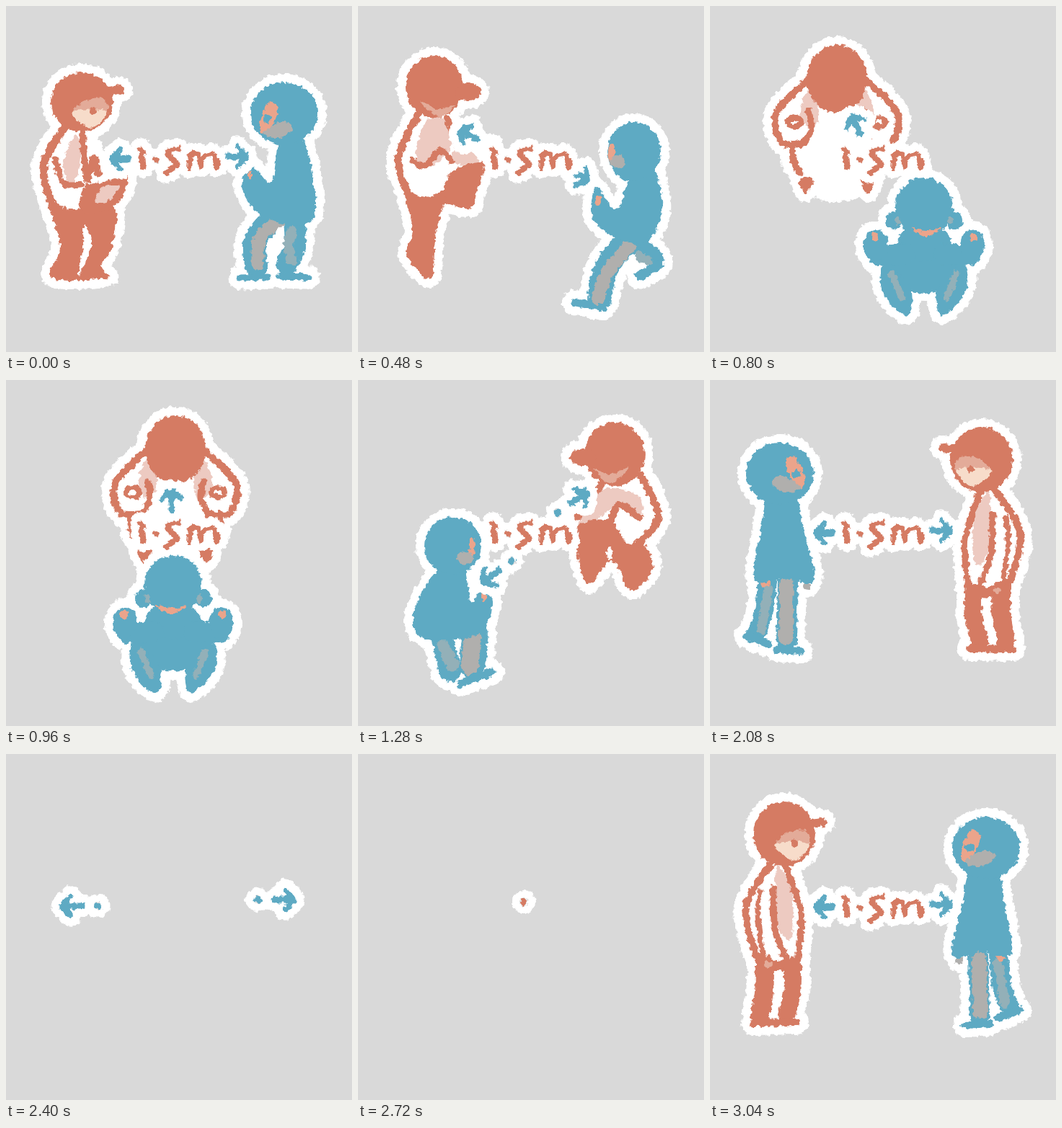
An HTML page for the animation above (3.2 s loop, 480 by 480 pixels).

```html
<!DOCTYPE html>
<html lang="en">
<head>
<meta charset="utf-8">
<title>Keep 1.5 m apart</title>
<style>
html, body { margin: 0; width: 100%; height: 100%; overflow: hidden; background: #d9d9d9; }
svg { display: block; width: 100vw; height: 100vh; }
</style>
</head>
<body>
<svg viewBox="0 0 480 480" role="img" aria-label="1.5 m">
  <filter id="fuzz" filterUnits="userSpaceOnUse" x="0" y="0" width="480" height="480" color-interpolation-filters="sRGB">
    <feTurbulence type="fractalNoise" baseFrequency=".16" numOctaves="2" seed="4"/>
    <feDisplacementMap in="SourceGraphic" scale="8" xChannelSelector="R" yChannelSelector="G"/>
  </filter>
  <g id="scene" filter="url(#fuzz)" stroke-linecap="round" stroke-linejoin="round"></g>
</svg>
<script>
const RED = '#d57b63', BLUE = '#5eaac3', WHITE = '#fff', GRAY = '#b0afad', DIM = '#93b0b8';
const PINK = '#edcac1', TAN = '#e3ab99', CREAM = '#f7dcca', SKIN = '#eba48b';

// Smooth curve through points
function spline(p, closed) {
  const n = p.length;
  const at = i => closed ? p[(i + n) % n] : p[Math.max(0, Math.min(n - 1, i))];
  let d = 'M' + p[0];
  for (let i = 0; i < (closed ? n : n - 1); i++) {
    const mix = (u, v, w) => u.map((q, k) => (q + (w[k] - v[k]) / 6).toFixed(1));
    d += `C${mix(at(i), at(i - 1), at(i + 1))} ${mix(at(i + 1), at(i + 2), at(i))} ${at(i + 1)}`;
  }
  return closed ? d + 'Z' : d;
}

const pairs = v => v.flatMap((x, i) => i % 2 ? [] : [[x, v[i + 1]]]);
const path = (v, closed) => `<path d="${spline(pairs(v), closed)}"`;
const blob = (color, ...v) => ({ color, w: 0, tag: path(v, true) });
const line = (color, w, ...v) => ({ color, w, tag: path(v, false) });
const oval = (color, x, y, rx, ry = rx) =>
  ({ color, w: 0, tag: `<ellipse cx="${x}" cy="${y}" rx="${rx}" ry="${ry}"` });

// A part and its mirror image about x = c
const both = (c, part) =>
  [part, { ...part, tag: `${part.tag} transform="translate(${2 * c} 0) scale(-1 1)"` }];

const paint = (tag, fill, color, w) =>
  `${tag} fill="${w && !fill ? 'none' : color}" stroke="${w ? color : 'none'}" stroke-width="${w}"/>`;

// All parts over one shared white rim
function draw(rim, ...parts) {
  const list = parts.flat();
  return list.map(p => paint(p.tag, !p.w, WHITE, p.w + rim)).join('') +
    list.map(p => paint(p.tag, !p.w, p.color, p.w)).join('');
}
const fig = (...parts) => draw(24, ...parts);

const group = (inner, t) => `<g transform="${t}">${inner}</g>`;
const move = (inner, x, y) => group(inner, `translate(${x} ${y})`);
const flip = inner => group(inner, 'translate(480 0) scale(-1 1)');

const redHead = (x, y, ry) => [
  line(RED, 12, x + 15, y - 12, x + 53, y - 17),
  oval(RED, x, y, 43, ry),
  blob(TAN, x - 12, y + 18, x + 3, y - 1, x + 31, y - 4, x + 32, y + 18),
  blob(CREAM, x - 14, y + 14, x + 32, y + 12, x + 26, y + 29, x + 8, y + 35),
  oval(RED, x + 15, y + 13, 5)
];
const blueHead = (x, y, fy) => [
  oval(BLUE, x, y, 47, 43),
  blob(SKIN, x - 35, fy + 7, x - 21, fy - 24, x - 8, fy - 13, x - 25, fy + 21),
  blob(GRAY, x - 30, fy + 19, x - 2, fy + 3, x + 12, fy + 13, x - 8, fy + 26),
  oval(BLUE, x - 23, fy, 6)
];

// b sways the bodies between planted feet and still heads
const redCrouch = b => fig(
  blob(WHITE, 82, 165, 55, 215, 64, 275, 112, 282, 132, 240, 108, 168),
  blob(PINK, 95, 180, 79 + b, 222, 94 + b, 250, 104, 200),
  blob(RED, 56, 265, 88, 282, 149, 278, 147, 332, 132, 362, 141, 377, 63, 377, 75 + b, 332),
  blob(WHITE, 108, 304, 119 + b, 328, 101, 374, 107 + b, 335),
  blob(RED, 110, 250, 140 + b, 243, 168 + b, 231, 163 + b, 262, 142, 282, 105, 285),
  blob(PINK, 124, 270, 135 + b, 251, 158 + b, 250, 140, 271),
  line(RED, 11, 82, 167, 52 + b, 222, 66, 282),
  line(RED, 9, 106, 168, 112 + b, 240, 122 + b, 211, 128 + b, 232),
  line(RED, 9, 68 + b, 212, 80 + b, 246, 104 + b, 248),
  redHead(105, 133, 41));

const blueCrouch = b => fig(
  line(BLUE, 32, 366, 298, 346 + b, 325, 347, 360),
  line(BLUE, 30, 400, 300, 401 + b, 330, 390, 358),
  line(BLUE, 9, 325, 377, 363, 376),
  line(BLUE, 9, 378, 375, 419, 376),
  line(GRAY, 17, 378, 299, 352 + b, 322, 349, 358),
  line(DIM, 14, 397, 312, 392 + b, 332, 397, 354),
  blob(BLUE, 380, 185, 368, 245, 340 - b, 220, 328 - b, 252, 354, 290, 413, 304, 430 - b, 272, 412, 185),
  line(SKIN, 4, 338 - b, 232, 338 - b, 238),
  blueHead(386, 149, 157));

const redStand = fig(
  blob(WHITE, 82, 150, 50, 215, 62, 282, 122, 282, 126, 215, 102, 150),
  blob(PINK, 93, 155, 115, 198, 112, 256, 94, 235),
  line(RED, 14, 68, 283, 92, 294, 120, 287),
  line(RED, 26, 76, 292, 75, 330, 69, 362),
  line(RED, 24, 115, 293, 114, 330, 106, 362),
  line(RED, 10, 60, 373, 120, 372),
  line(RED, 10, 86, 150, 50, 212, 64, 280),
  line(RED, 7, 70, 190, 66, 222, 74, 284),
  line(RED, 9, 103, 150, 126, 220, 122, 284),
  line(RED, 9, 88, 186, 90, 240, 104, 282),
  oval(TAN, 81, 292, 6, 4),
  redHead(103, 111, 45));

const blueStand = fig(
  line(BLUE, 28, 372, 280, 374, 362),
  line(BLUE, 26, 400, 280, 406, 325, 415, 350),
  line(BLUE, 10, 354, 376, 388, 374),
  line(BLUE, 12, 400, 366, 428, 355),
  line(GRAY, 20, 373, 284, 375, 358),
  line(DIM, 13, 399, 290, 409, 346),
  oval(SKIN, 404, 281, 6, 7),
  oval(GRAY, 346, 286, 5),
  blob(BLUE, 362, 160, 350, 208, 336, 278, 377, 275, 418, 277, 409, 208, 398, 160),
  blueHead(383, 130, 130));

const redKick = fig(
  blob(WHITE, 85, 150, 58, 225, 75, 268, 122, 265, 145, 205, 122, 150),
  blob(PINK, 95, 160, 125, 160, 127, 200, 94, 224, 80, 207),
  blob(PINK, 130, 205, 150, 196, 168, 218, 135, 219),
  blob(RED, 118, 262, 130, 230, 176, 217, 164, 260, 156, 281, 118, 272),
  blob(RED, 66, 260, 94, 266, 122, 258, 108, 315, 101, 378, 68, 347, 76, 310),
  line(RED, 10, 84, 150, 56, 210, 70, 262),
  line(RED, 9, 124, 156, 138, 196),
  line(RED, 9, 76, 214, 92, 222, 114, 201, 129, 215),
  oval(RED, 106, 112, 40, 43),
  oval(RED, 152, 119, 18, 12),
  blob(TAN, 86, 132, 112, 143, 134, 138, 112, 154));

const blueKick = fig(
  line(BLUE, 26, 388, 330, 411, 350),
  line(BLUE, 13, 391, 374, 418, 359),
  line(DIM, 13, 390, 346, 402, 354),
  line(BLUE, 34, 374, 328, 346, 360, 335, 405),
  line(BLUE, 10, 300, 411, 340, 419),
  line(GRAY, 18, 376, 334, 347, 368, 333, 405),
  blob(BLUE, 380, 233, 358, 283, 332, 251, 324, 290, 350, 318, 398, 328, 422, 285, 410, 225),
  oval(SKIN, 333, 270, 4, 7),
  oval(BLUE, 383, 202, 37, 41),
  oval(SKIN, 352, 204, 5, 14),
  oval(GRAY, 360, 216, 11, 9));

const redBack = fig(
  oval(WHITE, 235, 145, 80, 46),
  oval(WHITE, 235, 205, 55, 50),
  both(235, blob(PINK, 196, 110, 184, 145, 202, 168, 210, 140)),
  both(235, line(RED, 10, 197, 96, 152, 142, 158, 183, 188, 186)),
  both(235, line(RED, 9, 196, 141, 200, 164, 190, 184)),
  both(235, oval(RED, 176, 156, 13, 10)),
  both(235, oval(WHITE, 176, 156, 5, 3)),
  both(235, line(RED, 9, 172, 188, 175, 212, 184, 226)),
  both(235, blob(RED, 183, 235, 203, 235, 191, 255)),
  oval(RED, 235, 96, 42, 47));

const blueBack = fig(
  oval(BLUE, 232, 362, 54, 42),
  oval(BLUE, 232, 334, 38, 25),
  both(232, line(BLUE, 28, 168, 351, 205, 349)),
  both(232, oval(BLUE, 165, 337, 17, 22)),
  both(232, blob(BLUE, 178, 364, 172, 392, 185, 418, 210, 434, 213, 396)),
  both(232, oval(BLUE, 190, 303, 11, 13)),
  oval(BLUE, 232, 284, 40, 41),
  both(232, oval(DIM, 196, 303, 4, 6)),
  both(232, oval(SKIN, 164, 326, 5, 6)),
  both(232, line(DIM, 9, 187, 376, 201, 410)),
  blob(SKIN, 207, 313, 230, 317, 250, 313, 230, 325));

const redWalk = fig(
  blob(WHITE, 335, 145, 305, 195, 365, 230, 405, 222, 418, 180, 395, 132),
  blob(PINK, 340, 152, 388, 160, 391, 190, 356, 177, 312, 208, 308, 193),
  blob(RED, 303, 207, 350, 195, 372, 226, 396, 226, 409, 262, 378, 292, 352, 251, 318, 283),
  oval(WHITE, 349, 240, 4, 9),
  line(RED, 10, 392, 132, 417, 190, 384, 230),
  line(RED, 9, 338, 145, 304, 190),
  line(RED, 10, 350, 198, 363, 173, 390, 191),
  oval(RED, 356, 103, 42, 44),
  oval(RED, 312, 107, 18, 12),
  blob(TAN, 328, 123, 350, 131, 376, 121, 350, 143));

const blueWalk = fig(
  line(BLUE, 30, 117, 360, 128, 404),
  line(BLUE, 36, 163, 352, 158, 396),
  line(BLUE, 11, 142, 421, 186, 405),
  line(DIM, 17, 118, 368, 131, 396),
  line(GRAY, 24, 159, 360, 155, 397),
  blob(BLUE, 116, 258, 78, 320, 90, 358, 164, 354, 187, 312, 174, 290, 156, 308, 148, 262),
  oval(SKIN, 175, 300, 4, 7),
  oval(BLUE, 132, 230, 40),
  oval(SKIN, 158, 232, 4, 14),
  oval(GRAY, 149, 247, 12, 9));

const label = draw(22,
  line(RED, 9, 188, 199, 190, 223),
  oval(RED, 208, 213, 5),
  line(RED, 8, 239, 198, 223, 203, 236, 219, 222, 231),
  line(RED, 8, 254, 224, 257, 206, 268, 208, 270, 222),
  line(RED, 8, 271, 211, 287, 206, 293, 222));
const text = (s = 1) => group(label, `translate(240 212) scale(${s}) translate(-240 -212)`);

// An arrow has its tip at x, y; an optional dot trails behind
const arrow = ([x, y, angle, dot]) => group(draw(23,
  line(BLUE, 9, -30, 0, -14, 0),
  line(BLUE, 6, -16, -14, -3, 0, -16, 14),
  blob(BLUE, -1, 0, -17, -17, -13, 0, -17, 17),
  dot ? oval(BLUE, -dot, 0, 6, 5) : []
), `translate(${x} ${y}) rotate(${angle})`);
const arrows = list => list.map(arrow).join('');
const mirror = list => list.map(([x, y, a, dot]) => [480 - x, y, 180 - a, dot]);

const crouch = b => redCrouch(b) + blueCrouch(b);
const stand = redStand + blueStand;
const kick = redKick + blueKick;
const walk = redWalk + blueWalk;
const turn = move(redBack, 69, 5) + move(blueBack, -49, -5);

const level = [[143, 212, 180], [337, 209, 0]];
const tilt = [[138, 172, 205, 52], [322, 244, 30, 52]];
const steep = [[320, 154, -35, 52], [171, 283, 143, 52]];
const steeper = [[285, 150, -63]];
const up = [[230, 150, -90]];
const view = (people, list, size) => people + arrows(list) + text(size);

const STEP = 160;
const steps = [
  view(crouch(0), level),
  view(crouch(3), level),
  view(crouch(5), level),
  view(kick, tilt),
  view(flip(walk), mirror(steep)),
  view(flip(turn), mirror(steeper)),
  view(redBack + blueBack, up),
  view(turn, steeper),
  view(walk, steep),
  view(flip(kick), mirror(tilt)),
  view(flip(crouch(5)), level),
  view(flip(crouch(3)), level),
  view(flip(crouch(0)), level),
  view(flip(stand), level),
  view(move(flip(stand), 0, 3), [[108, 212, 180], [372, 206, 0]], .6),
  arrows([[74, 211, 180, 53], [403, 202, 0, 54]]),
  '',
  draw(22, oval(RED, 230, 205, 5)),
  view(stand, [[178, 212, 180], [302, 209, 0]], .6),
  view(stand, level)
];

const scene = document.getElementById('scene');
let shown = -1;
function tick() {
  const i = Math.floor(performance.now() / STEP) % steps.length;
  if (i !== shown) scene.innerHTML = steps[shown = i];
  requestAnimationFrame(tick);
}
tick();
</script>
</body>
</html>
```
